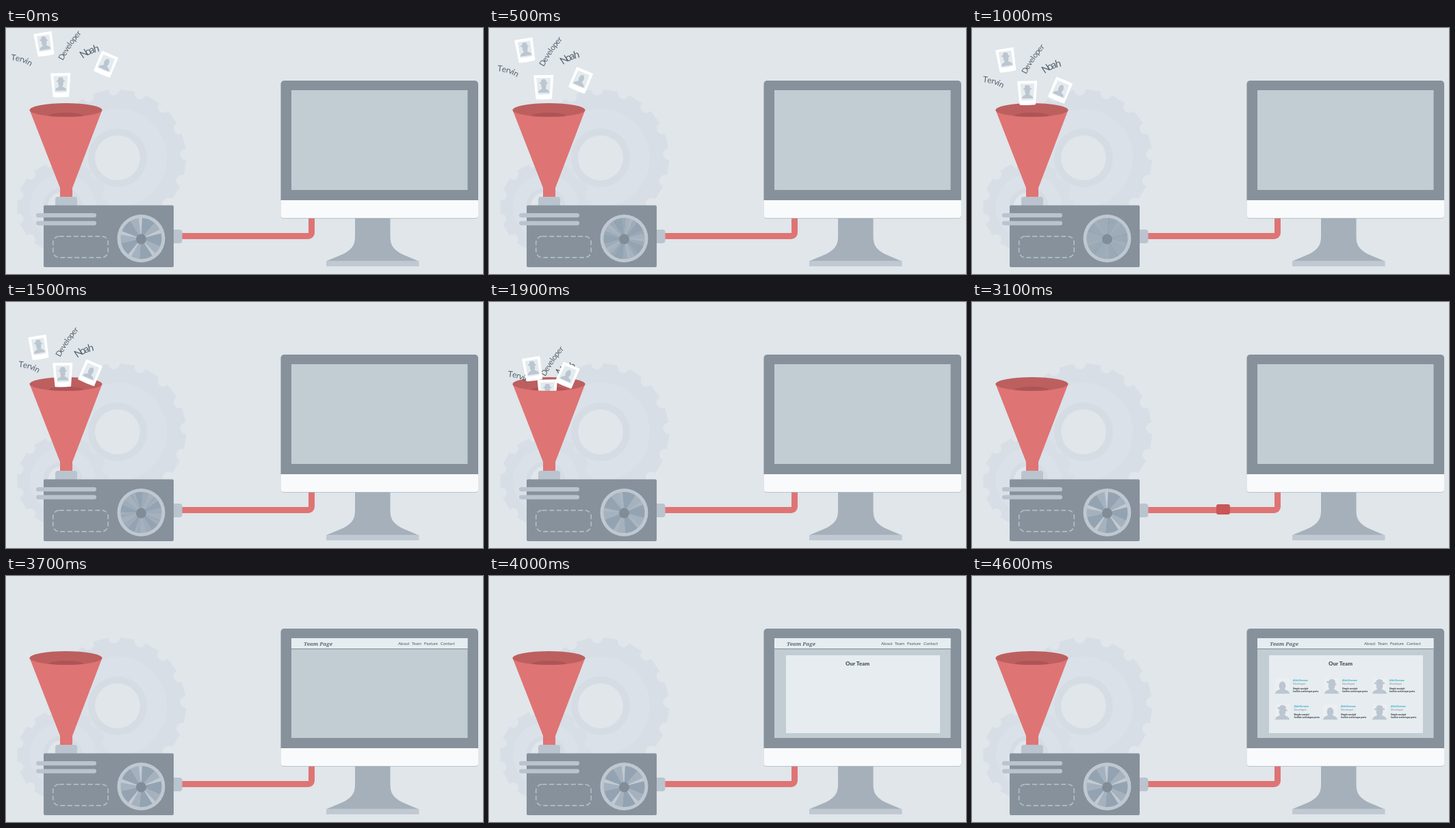
These frames come from a looping animation (697 px wide and 360 px high, 9600 ms). An HTML page with a canvas:

```html
<!DOCTYPE html>
<html lang="en">
<head>
<meta charset="utf-8">
<title>Team page machine</title>
<style>
  html, body { margin: 0; width: 100%; height: 100%; overflow: hidden; background: #e0e6ea; }
  canvas { display: block; }
</style>
</head>
<body>
<canvas id="stage" width="697" height="360"></canvas>
<script>
const ctx = document.getElementById('stage').getContext('2d');
const LOOP = 9600, STEP = 100, TAU = Math.PI * 2;
const BG = '#e0e6ea', RED = '#df7474', STEEL = '#86919b', SILVER = '#bac4ce', INK = '#56626d';
const SANS = 'Lato, sans-serif';
const rad = degrees => degrees * Math.PI / 180;

function fill(color, trace) {
  ctx.beginPath();
  trace();
  ctx.fillStyle = color;
  ctx.fill();
}
const box = (color, x, y, w, h, r = 0) => fill(color, () => ctx.roundRect(x, y, w, h, r));
const oval = (color, x, y, rx, ry = rx, turn = 0) =>
  fill(color, () => ctx.ellipse(x, y, rx, ry, turn, 0, TAU));
const shape = (color, path) => { ctx.fillStyle = color; ctx.fill(new Path2D(path)); };

function at(x, y, degrees, draw) {
  ctx.save();
  ctx.translate(x, y);
  ctx.rotate(rad(degrees));
  draw();
  ctx.restore();
}

function label(text, x, y, font, color, align = 'left') {
  ctx.font = font;
  ctx.fillStyle = color;
  ctx.textAlign = align;
  ctx.fillText(text, x, y);
}

// Letters follow a path whose direction turns steadily between two angles.
function bentLabel(text, size, from, to) {
  let x = 0, y = 0;
  [...text].forEach((letter, i) => {
    const angle = from + (to - from) * i / (text.length - 1);
    at(x, y, angle, () => label(letter, 0, 0, `${size}px ${SANS}`, INK));
    const advance = ctx.measureText(letter).width + 0.3;
    x += advance * Math.cos(rad(angle));
    y += advance * Math.sin(rad(angle));
  });
}

// Smooth curve through keys of [time, x, y].
function follow(keys, t) {
  const last = keys.length - 1;
  if (t >= keys[last][0]) return keys[last].slice(1);
  const i = keys.findIndex((key, n) => n < last && t < keys[n + 1][0]);
  const a = keys[i], b = keys[i + 1], span = b[0] - a[0], u = (t - a[0]) / span;
  const slope = (n, axis) => {
    const p = keys[Math.max(n - 1, 0)], q = keys[Math.min(n + 1, last)];
    return (q[axis] - p[axis]) / (q[0] - p[0]) * span;
  };
  return [1, 2].map(k =>
    (2 * u ** 3 - 3 * u * u + 1) * a[k] + (u ** 3 - 2 * u * u + u) * slope(i, k) +
    (3 * u * u - 2 * u ** 3) * b[k] + (u ** 3 - u * u) * slope(i + 1, k));
}

function gear(x, y, radius, teeth, firstNotch, notch) {
  fill('#d8dee6', () => {
    for (let i = 0; i < teeth; i++) {
      const a = rad(firstNotch) + i * TAU / teeth;
      ctx.arc(x + radius * Math.cos(a), y + radius * Math.sin(a), notch,
        a - Math.PI / 2, a - Math.PI * 1.5, true);
    }
  });
  oval('#dbe1e9', x, y, radius * 0.72);
  oval('#d5dce4', x, y, radius * 0.43);
  oval(BG, x, y, radius * 0.33);
}

function person(hat, tilt = 0) {
  const color = '#bcc6d1';
  shape(color, 'M-10 10C-9 4-3 6-2.5 2H2.5C3 6 9 4 10 10Z');
  oval(color, 0, -1, 4.6, 6);
  if (hat) at(0, -4.5, tilt, () => {
    oval(color, 0, 0, 7.5, 1.8);
    oval(color, 0, -2.5, 4.6, 3.2);
  });
}

function polaroid(top, bottom, half, hat, tilt) {
  const frame = (w1, w2, y1, y2) =>
    `M${-w1} ${y1}L${w1} ${y1}L${w2} ${y2}Q0 ${y2 + 1} ${-w2} ${y2}Z`;
  const outline = frame(top - 1, bottom - 1, 1 - half, half - 1);
  shape('#fff', outline);
  ctx.strokeStyle = '#fff';
  ctx.lineWidth = 2;
  ctx.lineJoin = 'round';
  ctx.stroke(new Path2D(outline));
  shape('#e4ebef', frame(top - 4, bottom - 3, 4 - half, half - 7));
  at(0, -1.5, 0, () => { ctx.scale(0.82, 0.97); person(hat, tilt); });
}

const falling = [
  { turn: 0, draw: () => bentLabel('Tervin', 12, 6, 30),
    keys: [[0, 7, 47], [500, 12, 63], [1000, 15.5, 79], [1500, 18, 95], [2000, 29, 112], [2400, 31, 117], [2700, 44, 150]] },
  { turn: 0, draw: () => bentLabel('Developer', 11.5, -61, -50),
    keys: [[0, 83, 48], [500, 80, 57], [1000, 79, 68], [1500, 79, 81], [2000, 83, 115], [2400, 84, 124], [2700, 82, 195]] },
  { turn: 0, draw: () => bentLabel('Noah', 15, -34, -14),
    keys: [[0, 112, 45], [500, 108, 54], [1000, 106, 67], [1500, 104, 82], [2000, 102, 114], [2400, 102, 124], [2700, 98, 175]] },
  { turn: -1, draw: () => polaroid(14.5, 11.8, 17.5, true, 0),
    keys: [[0, 80, 83.5], [500, 80, 86.5], [1000, 81, 95], [1500, 83, 106.5], [2000, 86, 137], [2400, 87, 155]] },
  { turn: -9, draw: () => polaroid(13.3, 12, 17, true, 8),
    keys: [[0, 56, 23.5], [500, 53, 32.5], [1000, 50, 47], [1500, 48, 66.5], [2000, 67, 104], [2400, 69.5, 111], [2700, 82, 155]] },
  { turn: 23, draw: () => polaroid(13, 13, 16, false),
    keys: [[0, 146, 53], [500, 134, 76.5], [1000, 129, 91], [1500, 123, 103.5], [2000, 113, 108], [2400, 111, 111.5], [2700, 98, 160]] },
];

function funnel(t) {
  const mouth = () => ctx.ellipse(87.5, 120, 53, 10, 0, 0, TAU);
  shape(RED, 'M34.5 120L79 234V248H97V234L140.5 120Z');
  fill('#bd5f5f', mouth);
  ctx.save();
  ctx.beginPath();
  mouth();
  ctx.clip();
  oval('#ad5456', 87.5, 128.5, 25, 4.7);
  ctx.restore();

  // Whatever drops below the front lip disappears.
  ctx.save();
  ctx.beginPath();
  ctx.rect(0, 0, 300, 120);
  mouth();
  ctx.clip();
  for (const { keys, turn, draw } of falling) at(...follow(keys, t), turn, draw);
  ctx.restore();
}

function blades(slits) {
  const sector = (color, from, to) => fill(color, () => {
    ctx.moveTo(0, 0);
    ctx.arc(0, 0, 30, rad(from), rad(to));
  });
  for (let a = 0; a < 360; a += 72) {
    sector('#93a3b1', a, a + 38);
    sector('#a5b2be', a + 38, a + 72);
    ctx.save();
    ctx.globalAlpha *= slits;
    sector('#c1cad3', a + 62, a + 72);
    ctx.restore();
  }
}

function fan(t) {
  const blur = Math.max(0, Math.min(t / 500, (3000 - t) / 1200, 1));
  const angle = -15 + Math.min(t, 3000) * 0.072;
  oval('#bfc8d1', 197.5, 308, 35);
  at(197.5, 308, angle, () => {
    blades(1 - blur);
    ctx.globalAlpha = blur * 0.4;
    ctx.rotate(rad(-angle * 0.6));
    blades(0.5);
  });
  oval('#808d99', 197.5, 309, 7.5);
}

function machine(t) {
  box(SILVER, 72, 247, 32, 16, 4);
  box(SILVER, 240, 295, 17.5, 20, 4);
  box(STEEL, 55, 259.5, 190, 90.5, 2);
  box(SILVER, 44, 271, 88, 6.2, 3);
  box(SILVER, 44, 282.5, 88, 6.2, 3);
  ctx.beginPath();
  ctx.roundRect(68.7, 304.8, 80.5, 31, 9);
  ctx.setLineDash([7, 3.5]);
  ctx.strokeStyle = '#b1bec7';
  ctx.lineWidth = 1.7;
  ctx.stroke();
  ctx.setLineDash([]);
  fan(t);
}

function pipe(t) {
  ctx.beginPath();
  ctx.moveTo(257, 304.5);
  ctx.arcTo(446.5, 304.5, 446.5, 278, 5);
  ctx.lineTo(446.5, 277);
  ctx.strokeStyle = RED;
  ctx.lineWidth = 9;
  ctx.stroke();
  const lump = '#c95757';
  if (t >= 2600 && t < 3500) box(lump, 257 + (t - 2600) / 5, 296, 20, 15, 3);
  else if (t === 3500) box(lump, 437, 294, 17, 17, 4);
  else if (t === 3600) box(lump, 439, 279, 15, 20, 3);
}

function member(x, y, textX, hat, tilt) {
  box('#ebeff2', x, y, 21, 22.5);
  at(x + 10.5, y + 11.7, 0, () => { ctx.scale(1.06, 1.06); person(hat, tilt); });
  label('Alda Norvane', textX, y + 4.3, `italic 900 3.7px ${SANS}`, '#3fb6d0');
  label('Developer', textX, y + 8.8, `4px ${SANS}`, '#7d8992');
  label('Simple suscipit', textX, y + 15.8, `900 3.3px ${SANS}`, '#3f4950');
  label('facilisis scelerisque porta', textX, y + 20, `900 3.3px ${SANS}`, '#3f4950');
}

const members = [
  [443, 150, 469, false, 0], [515, 150, 541, true, 16], [585, 150, 610, true, 0],
  [443, 188, 470.5, true, 16], [513, 188, 539, false, 0], [585, 188, 612, true, 0],
];

function page(t) {
  if (t >= 3700) {
    box('#e6edf0', 417, 91, 257.5, 15);
    box('#8d9aa4', 417, 106, 257.5, 1.2);
    label('Team Page', 435, 102.3, 'italic 700 7.6px "Noto Serif", cursive', INK);
    [['About', 573], ['Team', 593], ['Feature', 611], ['Contact', 635]]
      .forEach(([text, x]) => label(text, x, 101, `6px ${SANS}`, '#4b565f'));
  }
  if (t >= 3800) box('#e6ecef', 434, 116, 225, 114);
  if (t >= 3900) label('Our Team', 538.5, 131, `900 8px ${SANS}`, '#4b565f', 'center');
  members.slice(0, Math.max(0, (t - 4000) / STEP)).forEach(m => member(...m));
}

function monitor(t) {
  shape('#a5b0ba', 'M510 278V306C510 329 489 331 468 341.5H603C582 331 561.5 329 561.5 306V278Z');
  box('#c0c8d2', 468, 340.7, 135.5, 8);
  box('#a9bcc5', 401.5, 250, 288.5, 28.8, 4);
  box('#f9fafb', 401.5, 250, 288.5, 28, 4);
  box(STEEL, 401.5, 77, 288.5, 175, [5, 5, 0, 0]);
  box('#c1cdd3', 417, 91, 257.5, 146);
  page(t);
}

const start = performance.now();
function render() {
  const elapsed = Math.max(0, performance.now() - start) % LOOP;
  const t = Math.floor(elapsed / STEP) * STEP;
  box(BG, 0, 0, 697, 360);
  gear(163, 190, 100, 16, -70.5, 8.5);
  gear(83, 262, 67, 12, 15, 7.5);
  pipe(t);
  funnel(t);
  machine(t);
  monitor(t);
  requestAnimationFrame(render);
}
render();
</script>
</body>
</html>
```
